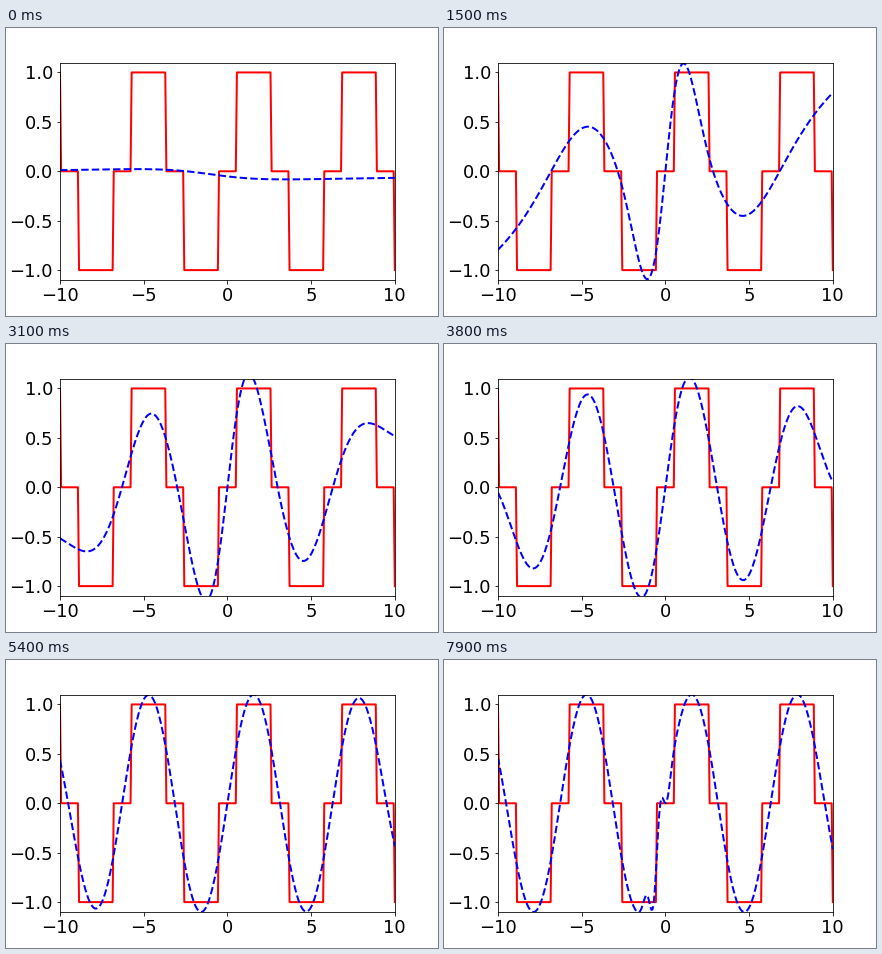
Write a matplotlib script that moves like this. It is 432x288 px and loops after 8 s.

```python
import numpy as np
import matplotlib.pyplot as plt
from matplotlib.animation import FuncAnimation

FRAMES, STEP = 80, 100
plt.rcParams["font.family"] = "DejaVu Sans"
x = np.linspace(-10, 10, 300)
u = np.abs(x) / 10


def wave(mid, core=0, edge=0, rate=1, lag=0, n=8):
    """Odd wave: core lifts the middle, edge the ends; lag slows it outwards."""
    amp = mid + core * np.exp(-(x / 2)**2) + edge * u**4
    return amp * np.sign(x) * np.sin(10 * rate * u - lag * u**n)


s = (x + 1) / 4.5
flat = -.03 - .104 * s / (1 + s**2)
rough = wave(.43, core=.95, edge=.37, rate=1.234, lag=4.6, n=2)
better = wave(.75, core=.64, edge=-.19, rate=1.055, lag=2.3, n=4)
close = wave(1.11, edge=-.34, lag=.17, n=10)
near = wave(1.1, edge=-.09, lag=.13)
fitted = wave(1.09, lag=.14)
kink = .38 * np.sin(6.04 * (x + .52)) * np.exp(-((x + .5) / .6)**2)
bent = wave(1.1, lag=.14) + kink

# time in ms, curve reached, easing exponent on the way there
keys = [(0, flat, 1), (1500, rough, 1.5), (3100, better, 1.1),
        (4500, close, 1.2), (5400, near, 1.5), (6700, fitted, 1.3),
        (7900, bent, .8)]


def curve(t):
    for (t0, a, _), (t1, b, p) in zip(keys, keys[1:]):
        if t <= t1:
            return a + (b - a) * (1 - (1 - (t - t0) / (t1 - t0))**p)


fig, ax = plt.subplots(figsize=(6, 4), dpi=72)
fig.subplots_adjust(left=.125, right=.9, bottom=.125, top=.88)
ax.set(xlim=(-10, 10), ylim=(-1.1, 1.1),
       xticks=[-10, -5, 0, 5, 10], yticks=[-1, -.5, 0, .5, 1])
ax.tick_params(labelsize=18)
ax.plot(x, np.round(np.sin(x)), color="red", lw=2)
fit, = ax.plot(x, flat, color="blue", lw=2, ls="--")


def update(i):
    fit.set_ydata(curve(i * STEP))
    return fit,


anim = FuncAnimation(fig, update, frames=FRAMES, interval=STEP,
                     repeat=True, repeat_delay=0)
plt.show()
```
